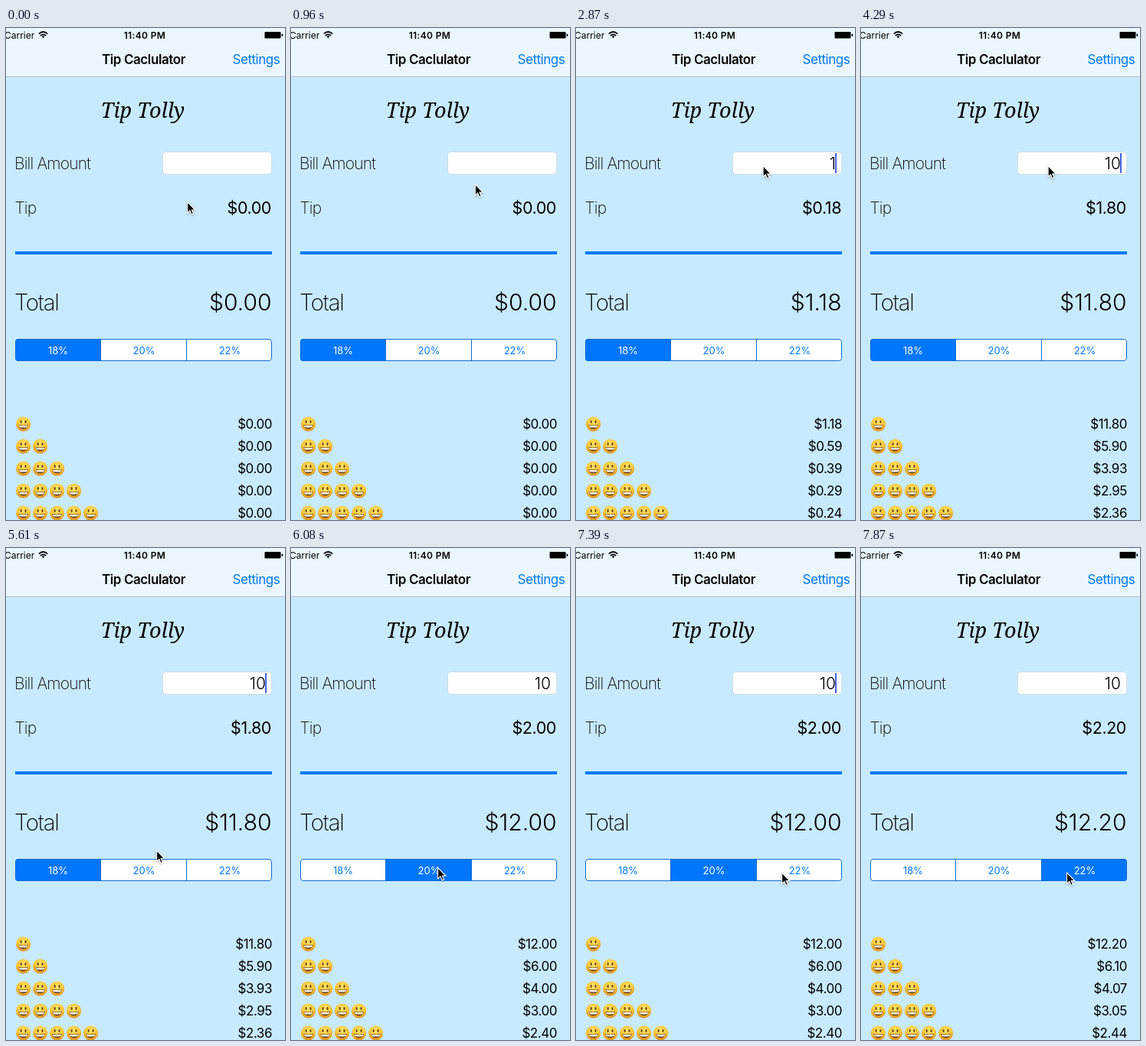
Recreate the animation shown at these times as an HTML page. Size 364x641 px, loop 8 s.

```html
<!DOCTYPE html>
<html lang="en">
<head>
<meta charset="utf-8">
<title>Tip calculator</title>
<style>
html, body { margin: 0; width: 100%; height: 100%; overflow: hidden; background: #c8eaff; }
svg { display: block; width: 100vw; height: 100vh; }
text { font-family: Inter, Roboto, sans-serif; font-size: 17px; letter-spacing: -.027em; }
.status { font-size: 12px; letter-spacing: 0; }
.clock { font-size: 12px; font-weight: 600; letter-spacing: .03em; }
.bold { font-weight: 600; letter-spacing: -.024em; }
.logo { font: italic 27px "Noto Serif", serif; letter-spacing: 0; }
.label { font-size: 21px; font-weight: 200; letter-spacing: -.04em; }
.total { font-size: 29.5px; font-weight: 200; letter-spacing: -.045em; }
.input { font-size: 21px; font-weight: 300; letter-spacing: 0; }
.tip { font-size: 21.5px; letter-spacing: -.02em; }
.sum { font-size: 30px; font-weight: 300; letter-spacing: 0; }
.seg { font-size: 13px; letter-spacing: 0; }
.mid { text-anchor: middle; }
.end { text-anchor: end; }
.blue { fill: #007aff; }
</style>
</head>
<body>
<svg viewBox="0 0 364 641">
  <defs>
    <radialGradient id="skin" cx=".5" cy=".35" r=".65">
      <stop offset="0" stop-color="#ffe56a"/>
      <stop offset=".65" stop-color="#f9c535"/>
      <stop offset="1" stop-color="#dd8a20"/>
    </radialGradient>
    <g id="smile">
      <circle r="9.6" fill="url(#skin)"/>
      <g fill="#6b4315">
        <ellipse cx="-2.9" cy="-3" rx="1.1" ry="1.9"/>
        <ellipse cx="2.9" cy="-3" rx="1.1" ry="1.9"/>
        <path d="M-6.4 .8Q0 2.2 6.4 .8Q5.6 6.6 0 6.6T-6.4 .8"/>
      </g>
      <path d="M-5.6 1.5Q0 2.7 5.6 1.5L4.8 3.9Q0 4.9-4.8 3.9Z" fill="#f4efe4"/>
    </g>
    <clipPath id="pill"><rect x="12" y="405" width="335" height="29" rx="4"/></clipPath>
    <filter id="shadow" x="-50%" y="-50%" width="200%" height="200%">
      <feDropShadow dx="0" dy="1" stdDeviation=".8" flood-opacity=".4"/>
    </filter>
  </defs>

  <rect width="364" height="641" fill="#c8eaff"/>
  <rect width="364" height="63" fill="#ebf6fe"/>
  <rect y="63" width="364" height="1" fill="#a9bdca"/>

  <text class="status" x="-2" y="13.5">Carrier</text>
  <g fill="none" stroke="#000" stroke-width="1.7">
    <path d="M42.8 7.6Q48.5 2.4 54.2 7.6M44.9 10Q48.5 6.8 52.1 10"/>
    <path d="M46.6 11.1Q48.5 9.6 50.4 11.1L48.5 13.3Z" fill="#000" stroke="none"/>
  </g>
  <text class="clock mid" x="181" y="13.5">11:40 PM</text>
  <rect x="337.5" y="5" width="21" height="8.5" rx="1"/>
  <rect x="359.6" y="7.5" width="1.6" height="3.6" rx=".8"/>

  <text class="bold mid" x="179.5" y="47">Tip Caclulator</text>
  <text class="blue" x="295.5" y="47">Settings</text>
  <text class="logo mid" x="178.5" y="117">Tip Tolly</text>

  <text class="label" x="11" y="184">Bill Amount</text>
  <rect x="204.5" y="161.5" width="142" height="29" rx="4.5" fill="#fff" stroke="#d3dde3"/>
  <text class="input end" id="bill" x="339" y="184"></text>
  <rect id="caret" x="338" y="163" width="2" height="26" fill="#4262e4"/>

  <text class="label" x="11.5" y="242">Tip</text>
  <text class="tip end" id="tip" x="346" y="242"></text>
  <rect class="blue" x="12" y="291" width="335" height="4"/>
  <text class="total" x="11" y="367.5">Total</text>
  <text class="sum end" id="total" x="346.5" y="367.5"></text>

  <g clip-path="url(#pill)">
    <rect x="12" y="405" width="335" height="29" fill="#fff"/>
    <rect id="chosen" y="405" width="112" height="29" fill="#0076ff"/>
  </g>
  <g fill="none" stroke="#0a6bd0">
    <path d="M123.5 405V434M235.5 405V434"/>
    <rect x="12.5" y="405.5" width="334" height="28" rx="3.5"/>
  </g>
  <g id="segments"></g>
  <g id="rows"></g>

  <path id="cursor" d="M.6 .6V15L3.9 11.9L6.1 17L8.5 16L6.3 11H10.8Z"
    stroke="#fff" stroke-width="1.1" filter="url(#shadow)"/>
</svg>
<script>
const LOOP = 8000;
const STEP = 119; // the screen refreshes in visible steps
const RATES = [18, 20, 22];
const ROWS = 5;

const BILL = "10";
const focusTime = 1680;
const keyTimes = [2750, 3220];
const tapTimes = [6080, 7510];

const home = { x: 236, y: 226 };
const moves = [
  { start: 840, end: 1440, x: 243.5, y: 179, sag: 0 },
  { start: 5130, end: 5960, x: 191, y: 416, sag: 0 },
  { start: 6560, end: 7390, x: 268, y: 422.5, sag: 7 }
];

const $ = id => document.getElementById(id);
const clamp = v => Math.min(1, Math.max(0, v));
const easeOut = p => 1 - (1 - p) ** 2.7;
const money = value => "$" + value.toFixed(2);
const countPast = (times, t) => times.filter(time => time <= t).length;

function pointerAt(t) {
  let { x, y } = home;
  for (const move of moves) {
    const p = easeOut(clamp((t - move.start) / (move.end - move.start)));
    x += (move.x - x) * p;
    y += (move.y - y) * p + move.sag * Math.sin(Math.PI * p);
  }
  return [x, y];
}

// The caret blinks, and every key press restarts the blink.
function caretOpacity(t) {
  if (t < focusTime) return 0;
  const lastInput = [focusTime, ...keyTimes].findLast(time => time <= t);
  const phase = (t - lastInput) % 1020;
  return clamp(Math.max(1 - (phase - 430) / 150, (phase - 890) / 130));
}

$("segments").innerHTML = RATES.map((rate, i) =>
  `<text class="seg mid" x="${68 + 112 * i}" y="424.5">${rate}%</text>`).join("");

$("rows").innerHTML = Array.from({ length: ROWS }, (_, row) => {
  const y = 516 + 29 * row;
  const faces = Array.from({ length: row + 1 }, (_, i) =>
    `<use href="#smile" x="${22.6 + 22 * i}" y="${y}"/>`).join("");
  return `${faces}<text class="end" x="347" y="${y + 6}"></text>`;
}).join("");

const segmentTexts = [...$("segments").children];
const shares = [...$("rows").querySelectorAll("text")];

function draw(time) {
  const t = Math.max(0, Math.floor((time - 5) / STEP) * STEP + 20);
  const bill = BILL.slice(0, countPast(keyTimes, t));
  const choice = countPast(tapTimes, t);
  const tip = bill * RATES[choice] / 100;
  const total = +bill + tip;

  $("bill").textContent = bill;
  $("tip").textContent = money(tip);
  $("total").textContent = money(total);
  shares.forEach((share, i) => share.textContent = money(total / (i + 1)));

  $("chosen").setAttribute("x", 12 + 111.7 * choice);
  segmentTexts.forEach((text, i) =>
    text.setAttribute("fill", i === choice ? "#fff" : "#007aff"));

  $("caret").setAttribute("opacity", caretOpacity(t));
  $("cursor").setAttribute("transform", `translate(${pointerAt(t)})`);
}

const begin = performance.now();
function tick() {
  draw((performance.now() - begin) % LOOP);
  requestAnimationFrame(tick);
}
tick();
</script>
</body>
</html>
```
